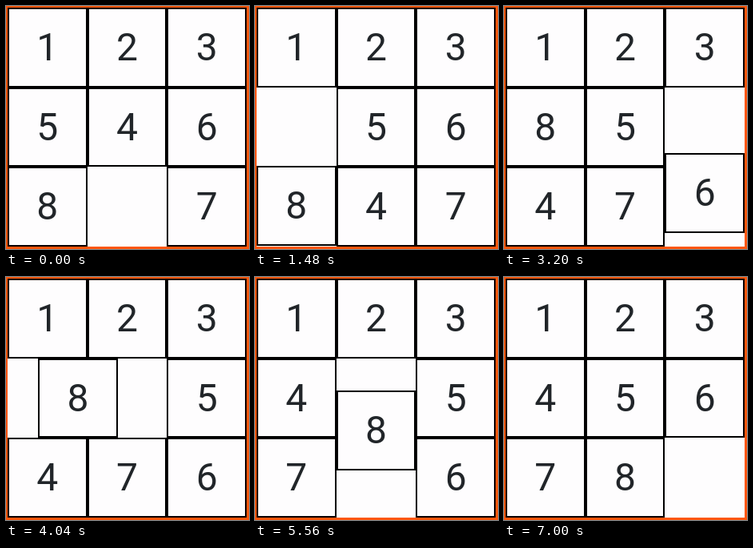
Write an HTML page that moves like this. It is 304 px wide and 304 px high and loops after 9.52 s.

```html
<!DOCTYPE html>
<html lang="en">
<head>
<meta charset="utf-8">
<title>Sliding puzzle</title>
<style>
  html, body { margin: 0; width: 100%; height: 100%; overflow: hidden; }
  #board {
    position: relative; box-sizing: border-box; width: 304px; height: 304px;
    background: #fefdfe; border: solid #fc560c; border-width: 2px 3px 3px 2px;
  }
  .tile {
    position: absolute; box-sizing: border-box; width: 99.67px; height: 99.67px;
    border: 2px solid #000; background: #fefdfe; color: #212529;
    font: 48px/95.67px Roboto, sans-serif; text-align: center;
  }
</style>
</head>
<body>
<div id="board"></div>
<script>
const LOOP = 9520, SLIDE = 500, PITCH = 299 / 3;
const layout = [1, 2, 3, 5, 4, 6, 8, 0, 7];
// Each move slides one tile into the gap: [tile, start time]
const moves = [
  [4, 450], [5, 955], [8, 1470], [4, 1955], [7, 2440], [6, 2937], [5, 3430],
  [8, 3922], [4, 4425], [7, 4930], [8, 5437], [5, 5940], [6, 6445]
];

const board = document.getElementById('board');
const tiles = [];
for (const n of layout) {
  if (!n) continue;
  const tile = tiles[n] = document.createElement('div');
  tile.className = 'tile';
  tile.textContent = n;
  board.append(tile);
}

// cubic-bezier(.25, .1, .25, 1)
function ease(x) {
  if (x <= 0) return 0;
  if (x >= 1) return 1;
  const curve = (u, a, b) => 3 * u * (1 - u) ** 2 * a + 3 * u * u * (1 - u) * b + u ** 3;
  let lo = 0, hi = 1;
  for (let i = 0; i < 24; i++) {
    const mid = (lo + hi) / 2;
    if (curve(mid, .25, .25) < x) lo = mid; else hi = mid;
  }
  return curve(lo, .1, 1);
}

const cellPos = i => ({ x: i % 3, y: Math.floor(i / 3) });

function draw(time) {
  const cells = layout.map((n, i) => i);
  const pos = [];
  const at = [];
  layout.forEach((n, i) => { at[n] = cells[i]; pos[n] = cellPos(i); });
  for (const [n, start] of moves) {
    if (time < start) break;
    const from = cellPos(at[n]), to = cellPos(at[0]);
    const k = ease((time - start) / SLIDE);
    pos[n] = { x: from.x + (to.x - from.x) * k, y: from.y + (to.y - from.y) * k };
    [at[n], at[0]] = [at[0], at[n]];
  }
  tiles.forEach((tile, n) => {
    tile.style.left = pos[n].x * PITCH + 'px';
    tile.style.top = pos[n].y * PITCH + 'px';
  });
}

const begin = performance.now();
function tick() {
  draw((performance.now() - begin) % LOOP);
  requestAnimationFrame(tick);
}
tick();
</script>
</body>
</html>
```
